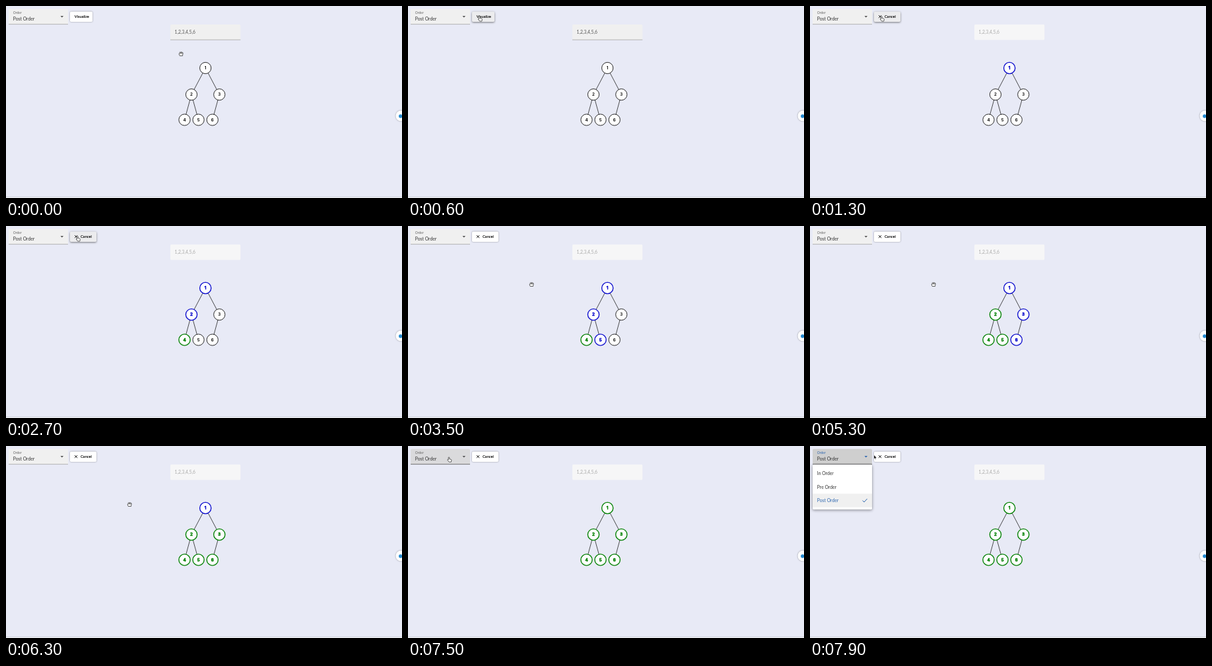
Animation of 600 by 291 pixels, one loop 8 s. Source, as an HTML page:

```html
<!DOCTYPE html>
<html lang="en">
<head>
<meta charset="utf-8">
<title>Tree traversal</title>
<style>
  html, body { margin: 0; width: 100%; height: 100%; overflow: hidden; background: #e8eaf6; }
  svg { display: block; width: 100%; height: 100%; font: 6.8px Lato, "Open Sans", sans-serif; }
  .small { font-size: 5px; fill: #666; }
  .button { font-size: 5.7px; font-weight: 500; fill: #111; stroke: #111; stroke-width: .1; }
  .raised { filter: drop-shadow(0 .7px .8px rgba(0, 0, 0, .38)); }
  .lifted { filter: drop-shadow(0 1px 1.5px rgba(0, 0, 0, .5)); }
  .panel { filter: drop-shadow(0 1.5px 2px rgba(0, 0, 0, .45)); }
  .node text { font: 700 6.2px Inter, sans-serif; text-anchor: middle; }
  #edges { stroke: #222; stroke-width: .8; }
  #cursor { stroke-linejoin: round; }
</style>
</head>
<body>
<svg viewBox="0 0 600 291" preserveAspectRatio="none">
  <path d="M0 289.5H600" stroke="#d0d2dc"/>
  <path d="M0 290.5H600" stroke="#fafafc"/>

  <rect id="select" x="4" y="4.5" width="90" height="23.6" rx="1.7"/>
  <rect id="underline" x="4" y="27.4" width="90" height=".7"/>
  <text id="label" class="small" x="10.8" y="11.7">Order</text>
  <text x="10.8" y="22.2" fill="#333">Post Order</text>
  <path id="caret" d="M82.5 15H87.1L84.8 17.4Z"/>

  <rect id="button" x="97" y="8.5" height="15.5" rx="1.7"/>
  <text id="visualize" class="button" x="103.8" y="18.2">Visualize</text>
  <g id="cancel">
    <path d="M104 14L108.2 18.2M108.2 14L104 18.2" stroke="#111" stroke-width=".9"/>
    <text class="button" x="113" y="18.2">Cancel</text>
  </g>

  <rect id="field" x="249" y="28" width="106.3" height="23.5" rx="1.7"/>
  <rect id="fieldLine" x="249" y="50.8" width="106.3" height=".7" fill="#999"/>
  <text id="values" x="255.5" y="42">1,2,3,4,5,6</text>

  <g id="edges"></g>
  <g id="nodes"></g>

  <circle class="raised" cx="598.5" cy="166.5" r="8" fill="#fff"/>
  <circle cx="597.8" cy="167" r="2.7" fill="#2389d0"/>

  <g id="menu">
    <rect class="panel" x="4" y="28.2" width="90" height="68" rx="1.7" fill="#fff"/>
    <rect x="4" y="72.3" width="90" height="20.5" fill="#f0f0f0"/>
    <g fill="#333">
      <text x="10.8" y="44.2">In Order</text>
      <text x="10.8" y="64.7">Pre Order</text>
      <text x="10.8" y="85.1" fill="#3068b0">Post Order</text>
    </g>
    <path d="M79.6 82.6L82 85L86.6 80" fill="none" stroke="#3068b0" stroke-width="1"/>
  </g>
  <path id="cursor"/>
</svg>
<script>
const LOOP = 8000, STEP = 100;
const BLACK = [20, 20, 20], BLUE = [12, 12, 205], GREEN = [0, 128, 0];
const $ = id => document.getElementById(id);
const clamp = v => Math.min(1, Math.max(0, v));
const ramp = (t, from, to) => clamp((t - from) / (to - from));
const ease = p => p * p * (3 - 2 * p);
const mix = (a, b, p) => a + (b - a) * p;
const show = (el, on) => el.style.display = on ? "" : "none";

function add(parent, tag, attrs, text = "") {
  const el = document.createElementNS("http://www.w3.org/2000/svg", tag);
  set(el, attrs);
  el.textContent = text;
  return parent.appendChild(el);
}
function set(el, attrs) {
  for (const name in attrs) el.setAttribute(name, attrs[name]);
}

// Position, time entered (blue) and time finished (green)
const tree = [
  { x: 302.2, y: 94, enter: 1100, done: 6600 },
  { x: 281, y: 134.2, enter: 1600, done: 4100 },
  { x: 323.3, y: 134.2, enter: 4600, done: 6100 },
  { x: 270.5, y: 172.5, enter: 2100, done: 2500 },
  { x: 291.6, y: 172.5, enter: 3100, done: 3600 },
  { x: 312.8, y: 172.5, enter: 5100, done: 5600 }
];
tree.forEach((n, i) => {
  const up = tree[(i - 1) >> 1];
  if (up) add($("edges"), "line", { x1: up.x, y1: up.y, x2: n.x, y2: n.y });
  const g = add($("nodes"), "g", { class: "node" });
  n.ring = add(g, "circle", { cx: n.x, cy: n.y, r: 8.6, fill: "#fff" });
  n.digit = add(g, "text", { x: n.x, y: n.y + 2.25 }, i + 1);
});

const shapes = {
  grab: "M-2 3.2L-3.2 .6Q-3.2-.4-2.2 0L-2.3-1.8Q-1.6-2.8-1-2Q-.4-3.2 .3-2.3Q1.2-3 1.7-1.8Q2.8-2 2.8-.8L2.2 3.2ZM-1-2V0M.3-2.3V0M1.7-1.8V.2",
  point: "M-.8 .5Q-.8-.3 0-.3T.8 .5V2.6L3 3.1Q4 3.4 3.9 4.4L3.3 7H.2L-2 4.2Q-2.4 3.4-1.6 3.3L-.8 3.8Z",
  arrow: "M0 0V5.6L1.3 4.5L2.2 6.4L3.1 6L2.3 4.2H4Z"
};
const moves = [
  { from: 0, to: 600, x: 108.5, y: 16 },
  { from: 2900, to: 3500, x: 187.3, y: 88.3 },
  { from: 6900, to: 7500, x: 62, y: 17.2 },
  { from: 7700, to: 7900, x: 97, y: 13.8 }
];
function pointerAt(t) {
  let x = 265.3, y = 72.3;
  for (const m of moves) {
    const p = ease(ramp(t, m.from, m.to));
    x = mix(x, m.x, p);
    y = mix(y, m.y, p);
  }
  return { x, y };
}

function drawNode(n, t) {
  const a = ramp(t, n.enter, n.enter + 200), b = ramp(t, n.done, n.done + 200);
  const rgb = BLACK.map((v, i) => Math.round(mix(mix(v, BLUE[i], a), GREEN[i], b)));
  const color = `rgb(${rgb})`;
  set(n.ring, { stroke: color, "stroke-width": mix(.9, 1.35, a) });
  set(n.digit, { fill: color, stroke: color, "stroke-width": .5 * a });
}

function draw(t) {
  const { x, y } = pointerAt(t);
  const running = t >= 700, open = ramp(t, 7700, 7900);
  const width = running ? 40 : 34;
  const overSelect = x > 4 && x < 94 && y > 4 && y < 28;
  const overButton = !open && x > 97 && x < 97 + width && y > 8 && y < 24;

  set($("select"), { fill: open ? "#cfcfcf" : overSelect ? "#dadadc" : "#f0f0f0" });
  set($("underline"), { fill: open || overSelect ? "#444" : "#999" });
  $("label").style.fill = open ? "#3068b0" : "#666";
  set($("caret"), { fill: open ? "#3068b0" : "#555" });

  set($("button"), { width, fill: overButton ? "#ececee" : "#fff", class: overButton ? "lifted" : "raised" });
  show($("visualize"), !running);
  show($("cancel"), running);

  set($("field"), { fill: running ? "#f6f6f7" : "#f0f0f0" });
  show($("fieldLine"), !running);
  set($("values"), { fill: running ? "#aaa" : "#555" });

  tree.forEach(n => drawNode(n, t));

  set($("menu"), {
    opacity: open,
    transform: `translate(0 28.2) scale(1 ${mix(.8, 1, open)}) translate(0 -28.2)`
  });

  const kind = overSelect && !open || overButton ? "point" : y > 55 ? "grab" : "arrow";
  const dark = kind === "arrow";
  set($("cursor"), {
    d: shapes[kind],
    transform: `translate(${x} ${y})`,
    fill: dark ? "#000" : "#fff",
    stroke: dark ? "#fff" : "#222",
    "stroke-width": dark ? .4 : .7
  });
}

const start = performance.now();
function tick() {
  const t = (performance.now() - start) % LOOP;
  draw(Math.floor(t / STEP) * STEP);
  requestAnimationFrame(tick);
}
tick();
</script>
</body>
</html>
```
